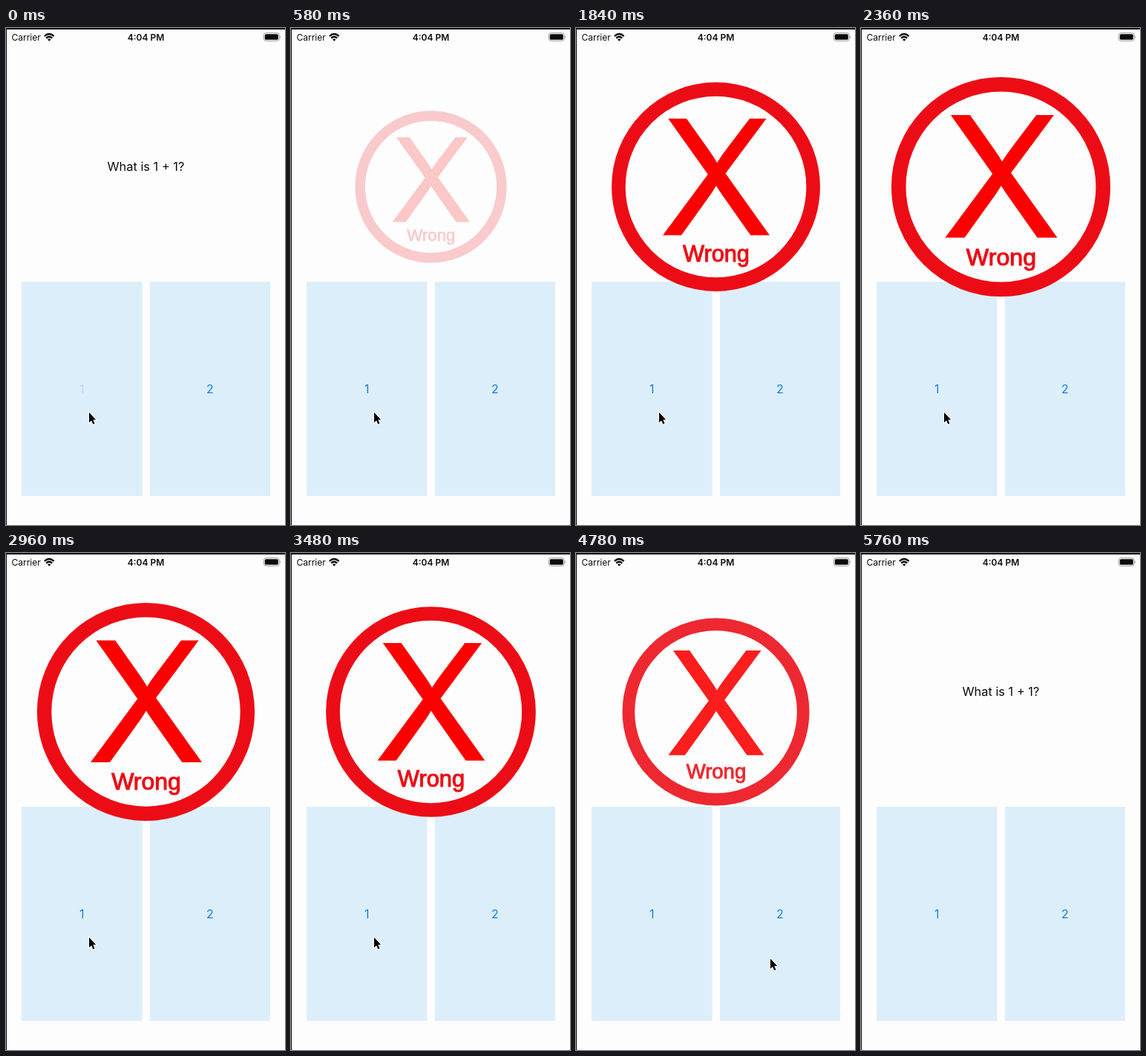
An HTML page that plays this animation: 376 px wide and 668 px high, repeating every 7.08 s.

```html
<!DOCTYPE html>
<html lang="en">
<head>
<meta charset="utf-8">
<title>Quiz</title>
<style>
  html, body { margin: 0; width: 100%; height: 100%; overflow: hidden; background: #fdfdfd; }
  svg { display: block; width: 100vw; height: 100vh; }
  text { font-family: Inter, Roboto, sans-serif; }
  .mid { text-anchor: middle; }
  .answer { font-size: 16px; fill: #1a7fe6; }
  .wrong { font: 32px "Liberation Sans", Arial, sans-serif; }
</style>
</head>
<body>
<svg viewBox="0 0 376 668">
  <rect width="376" height="668" fill="#fdfdfd"/>
  <path d="M0 0H376V2H1V668H0Z" fill="#121212"/>

  <g fill="#0c0c0c">
    <text x="7.5" y="16.5" font-size="12">Carrier</text>
    <text class="mid" x="188.5" y="16.5" font-size="12" font-weight="600">4:04 PM</text>
    <g fill="none" stroke="#0c0c0c" stroke-width="2.3">
      <path d="M51.8 11Q58.2 4.9 64.6 11"/>
      <path d="M54.2 13.6Q58.2 9.8 62.2 13.6"/>
    </g>
    <path d="M56 15.4Q58.2 13.4 60.4 15.4L58.2 17.8Z"/>
    <rect x="347.3" y="6.7" width="21" height="10.6" rx="3" fill="none" stroke="#9a9a9a"/>
    <rect x="348.8" y="8.2" width="18" height="7.6" rx="1.6"/>
    <path d="M369.3 10.2Q371.3 12 369.3 13.8Z" fill="#9a9a9a"/>
  </g>

  <text id="question" class="mid" x="188.4" y="192" font-size="16.4" fill="#0c0c0c">What is 1 + 1?</text>

  <g fill="#dceefa">
    <rect x="21" y="341" width="162.5" height="288"/>
    <rect x="194" y="341" width="162" height="288"/>
  </g>
  <text id="first" class="mid answer" x="102.3" y="491">1</text>
  <text class="mid answer" x="275" y="491">2</text>

  <g id="badge">
    <circle r="136.8" fill="none" stroke="#ec0c16" stroke-width="19.4"/>
    <path fill="#fc0000" transform="translate(-75.5 67.8) scale(.1116 -.1116)"
      d="M9 0L576 764L76 1466H307L573 1090Q656 973 691 910Q740 990 807 1077L1102 1466H1313L798 775L1353 0H1113L744 523Q713 568 680 621Q631 541 610 511L242 0Z"/>
    <text class="mid wrong" x=".5" y="104.5" fill="#ec0c16" stroke="#ec0c16" stroke-width="1.1">Wrong</text>
  </g>

  <path id="cursor" d="M0 0V13.4L3.1 10.6L5.3 15.6L7.5 14.6L5.3 9.7H9.3Z" fill="#000" stroke="#fff" stroke-width="2" paint-order="stroke"/>
</svg>
<script>
  const LOOP = 7080, TAP = 120, END = 5760;
  const FULL = 146.5;
  const [question, first, badge, cursor] =
    ["question", "first", "badge", "cursor"].map(id => document.getElementById(id));

  const span = (t, a, b) => Math.min(1, Math.max(0, (t - a) / (b - a)));
  const ease = (t, a, b) => (1 - Math.cos(Math.PI * span(t, a, b))) / 2;

  function draw(t) {
    // Swell by half, then settle back part of the way.
    const radius = 97.3 + 50.3 * ease(t, TAP, 2400) - 22 * ease(t, 2640, 4990);
    const alpha = ease(t, TAP, 1640) * (1 - ease(t, 4500, END));
    badge.setAttribute("transform", `translate(188.5 213.5) scale(${radius / FULL})`);
    badge.setAttribute("opacity", alpha);

    question.setAttribute("opacity", 1 - ease(t, TAP, 450) + ease(t, 5320, END));
    first.setAttribute("opacity", 0.2 + 0.8 * ease(t, TAP, 520));

    // The pointer sweeps off to the right.
    const dx = 264 * span(t, 4300, 5000) ** 1.5;
    cursor.setAttribute("transform", `translate(${112 + dx} ${516.8 + dx * 0.19})`);
    cursor.setAttribute("visibility", t < 5000 ? "visible" : "hidden");
  }

  let start;
  function tick(now) {
    start ??= now;
    draw((now - start) % LOOP);
    requestAnimationFrame(tick);
  }
  draw(0);
  requestAnimationFrame(tick);
</script>
</body>
</html>
```
